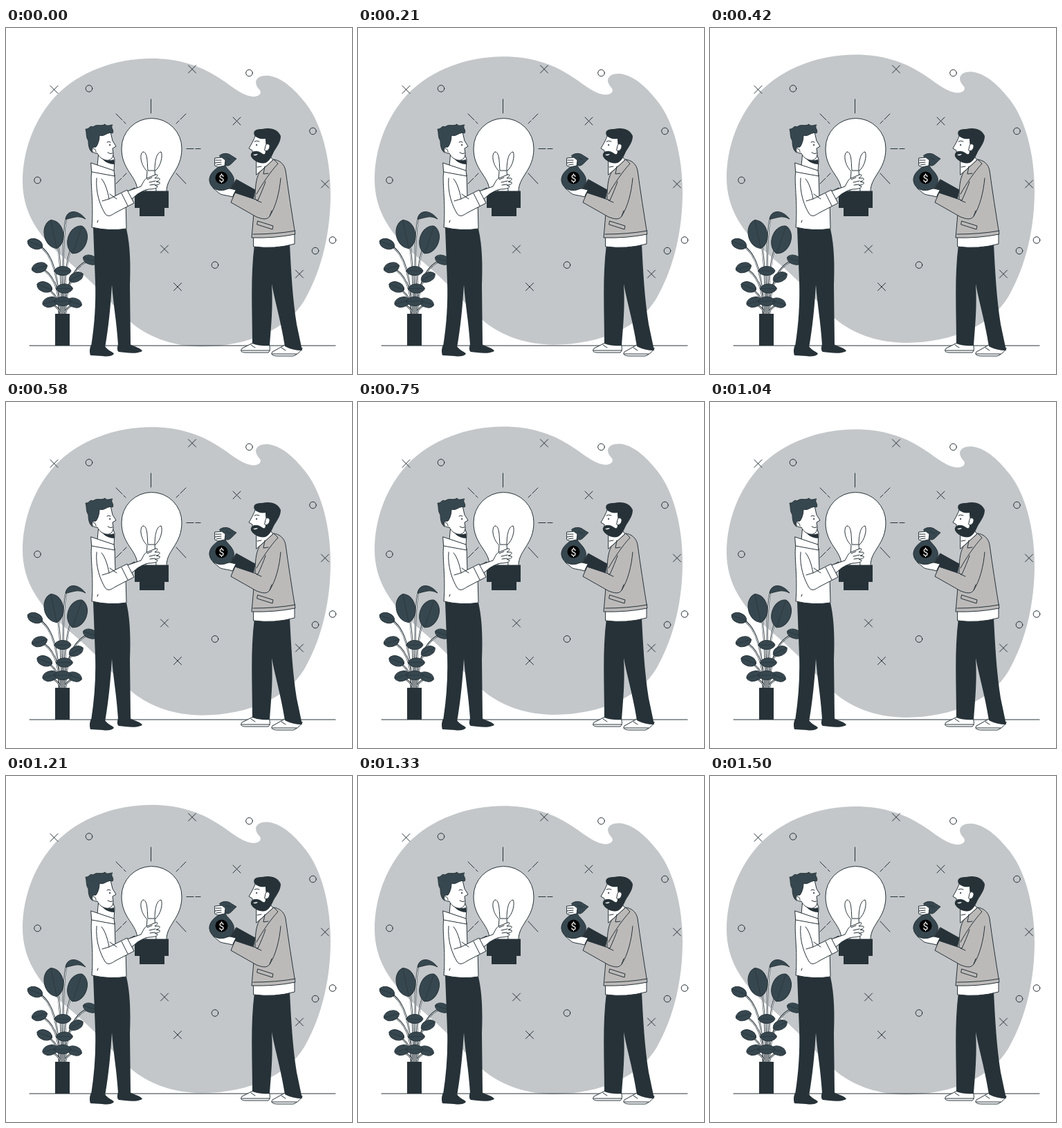
Write an HTML page that moves like this. It is 500 px wide and 500 px high and loops after 1.54 s.

```html
<!DOCTYPE html>
<html lang="en">
<head>
<meta charset="utf-8">
<title>Idea for funding</title>
<style>
html, body { margin: 0; width: 100%; height: 100%; overflow: hidden; background: #fff }
svg { display: block; width: 100vw; height: 100vh }
.ink { fill: none }
.dark { fill: #263238 }
.slate { fill: #37474f }
.skin { fill: #fff }
.coat { fill: #bcbab9 }
.flat { stroke: none }
.crosses { fill: none; stroke: none; marker: url(#cross) }
.rings { fill: none; stroke: none; marker: url(#ring) }
</style>
</head>
<body>
<svg viewBox="0 0 500 500" stroke="#263238" stroke-linecap="round" stroke-linejoin="round">
  <defs>
    <marker id="cross" viewBox="-7 -7 14 14" markerWidth="14" markerHeight="14" markerUnits="userSpaceOnUse">
      <path d="M-5.500 -5.500L5.500 5.500M5.500 -5.500L-5.500 5.500"/>
    </marker>
    <marker id="ring" viewBox="-7 -7 14 14" markerWidth="14" markerHeight="14" markerUnits="userSpaceOnUse">
      <circle r="4.800" class="ink"/>
    </marker>
  </defs>

  <path id="blob" class="flat" fill="#c3c7ca" d="M24 222C24 176 42 130 72 98C106 63 158 44 210 44C248 44 280 54 306 71C324 82 338 96 355 99C365 100 370 95 367 90C363 86 361 82 361 78C362 71 370 68 380 69C401 72 420 92 434 110C456 139 469 188 469 240C469 292 458 347 431 394C407 434 352 460 283 460.500C244 460 211 449 185 429C164 412 148 391 128 372C111 355 94 341 77 326C47 300 24 266 24 222Z"/>
  <path class="ink" d="M34 459H476"/>
  <path class="crosses" d="M69.500 89L269 59.500L333.500 134.500L461 225.500L229 319.500L248 374L424 355.500"/>
  <path class="rings" d="M120 87.500L351.500 65L443.500 149L45.500 220L302 342.500L447 322L472 306.500"/>

  <g id="plant"></g>
  <path class="slate" d="M86 276C88 263 103 261 115 276C104 270 98 274 88 276Z"/>
  <path class="dark flat" d="M71 413H92V459H71Z"/>

  <g id="bulb">
    <path class="skin" d="M190 236C190 214 167 206 167 174A43.500 43.500 0 0 1 254 174C254 206 232 214 232 236Z"/>
    <path class="ink" d="M202 236L204 207C195 199 192 182 198 179C205 179 204 197 205 206H215C215 194 217 180 224 179C227 184 224 200 215 207L217 236"/>
    <path class="dark flat" d="M186 235.500H235V260H229V272H193V260H186Z"/>
    <path class="ink" d="M209.500 103V123M159 124L168 133M170 135L173 138M260 124L252 132M250 134L246 138M261 174.500H271M274 174.500H281M246 210L260 225M174 210L169 215M167 217L159 225"/>
  </g>

  <g id="inventor">
    <path class="dark" d="M162 243L186 231L188 238L169 249Z"/>
    <path class="dark flat" d="M123 458C120 464 121 470 122 473L139 474C146 475 152 475 156 471C155 468 148 467 143 460ZM162 457C160 463 161 467 163 468C173 469 187 472 197 467C195 462 186 461 179 457Z"/>
    <path class="dark flat" d="M126 288L174 290C180 316 180 345 179 372L180 458L162 458C160 425 155 399 153 371C151 404 148 434 143 462L123 460C128 428 130 398 129 367Z"/>
    <path class="skin" d="M134 178L132 199L156 207L157 190L151 174Z"/>
    <path class="skin" d="M128 157L151 150L154 163L159 171L154 174L155 181C155 189 150 192 144 191C137 189 134 185 132 181C123 182 122 171 129 172Z"/>
    <path class="dark flat" d="M139 189Q147 193 156 190L157 197Q146 197 139 189Z"/>
    <path class="slate" d="M125 180C120 177 119 169 119 163C115 157 117 152 115 146C120 147 121 140 126 143C131 138 138 143 143 139C146 143 150 140 154 140C150 144 157 147 154 152C147 149 142 158 135 155C135 162 133 168 130 172C124 170 122 176 125 180Z"/>
    <path class="ink" d="M126 174Q130 175 130 179M146 165Q149 163 151 165M147 180Q151 183 154 181"/>
    <circle class="dark" cx="150" cy="169" r=".6"/>
    <path class="skin" d="M124 207C121 219 127 252 124 288Q150 294 174 290L173 250L167 240L158 244L157 212Z"/>
    <path class="skin" d="M123 195L156 206L157 214L124 208Z"/>
    <path class="skin" d="M172 237L195 229C198 224 200 218 204 217L216 212C220 211 220 214 215 217L221 217C224 218 221 221 217 222L222 223C223 226 219 227 215 227L219 229C219 232 211 233 206 233C200 234 195 237 190 240L176 252Z"/>
    <path class="skin" d="M131 217C129 239 137 258 143 268C147 274 152 271 158 267L185 253L175 234L149 247C147 236 143 223 138 218"/>
    <path class="ink" d="M167 239L176 257M149 247L139 250M150 240L160 247M204 219L211 216M207 223L216 221M208 227L215 226M133 278L132 281"/>
  </g>

  <g id="investor">
    <path class="skin" d="M357 455L341 463C338 467 340 469 347 469L379 469C383 466 381 460 380 456ZM403 458L385 468C382 472 386 474 393 474L415 474C421 472 426 467 428 463Z"/>
    <path class="ink" d="M340 466H381M384 471L420 471M354 458L360 462M398 462L404 466"/>
    <path class="dark flat" d="M359 313L410 312C412 351 414 390 420 428L428 466Q414 466 403 460C397 422 389 397 384 370C386 404 383 431 381 459Q367 460 356 456C356 408 353 360 359 313Z"/>
    <path class="skin" d="M358 299L417 297V312Q388 320 358 316Z"/>
    <path class="dark" d="M333 219L360 234L357 249L326 241L323 233Z"/>
    <path class="skin" d="M362 184L378 180L386 191L362 212Z"/>
    <path class="skin" d="M361 154L384 152L385 172L378 188L357 189L356 177L351 174C354 169 358 162 361 154Z"/>
    <path class="dark flat" d="M359 155C356 147 364 146 370 146C382 143 393 146 397 156C397 165 391 172 387 179C384 186 381 192 375 195C367 197 358 192 355 187C352 183 355 177 361 178C368 177 371 184 374 182C377 176 375 166 375 160C368 161 362 159 359 155Z"/>
    <path class="skin" d="M375 170C376 166 382 167 381 172C380 176 377 179 374 177Z"/>
    <path class="skin flat" d="M357 183Q361 186 364 182Z"/>
    <path class="ink" d="M359 164Q363 162 366 164M363 201L369 200"/>
    <circle class="dark" cx="362" cy="169" r=".6"/>
    <path class="coat" d="M387 190C395 191 402 196 404 206C408 235 413 268 418 298Q388 304 355 303L360 246C360 232 361 218 366 209Z"/>
    <path class="coat" d="M397 217C395 238 390 258 381 272C377 278 370 276 362 273L325 252L331 238L364 249C368 240 372 231 375 222"/>
    <path class="ink" d="M387 190L393 196C382 208 371 224 362 240M374 200L372 211L379 210M357 298Q390 298 418 293M364 279L386 286L385 291L363 284ZM362 249L369 252M381 272L384 264"/>
    <path class="skin" d="M332 234L324 232L313 233C308 230 302 227 299 229C298 232 303 234 306 237C310 242 317 241 327 244Z"/>
  </g>

  <g id="money">
    <path class="slate" d="M309 200C301 204 293 212 294 221C296 233 307 236 316 234C327 231 332 222 328 214C325 207 319 204 317 199Z"/>
    <path class="slate" d="M309 184C315 180 321 181 325 184L333 189C328 193 325 198 321 199L314 198Z"/>
    <path class="skin" d="M302 188L312 187L317 191L316 199L306 201L302 199Z"/>
    <path class="ink" d="M303 191L311 191M302 195L311 194M304 198L311 197M318 187L324 190"/>
    <circle class="flat" cx="311.500" cy="216.500" r="9"/>
    <text class="skin flat" x="311.500" y="221.500" text-anchor="middle" font-family="Roboto, sans-serif" font-size="14">$</text>
  </g>
</svg>
<script>
const get = id => document.getElementById(id);

function leaf(x, y, length, width, angle) {
  return `<g transform="translate(${x} ${y}) rotate(${angle})">
    <path class="slate" d="M${-length} 0C${-length * .8} ${-width * 1.3} ${length * .7} ${-width * 1.4} ${length} 0C${length * .7} ${width * 1.4} ${-length * .8} ${width * 1.3} ${-length} 0Z"/>
    <path d="M${-length * .9} 0H${length * .9}" stroke-width=".6"/>
  </g>`;
}

// A stem leaves the pot upright and bends towards its leaf.
function stem(x, y) {
  const root = 81.5 + (x - 82) * .12;
  const path = `M${root} 413Q${root} ${y + 12} ${x} ${y}`;
  return `<path class="ink" stroke-width="2.4" d="${path}"/><path class="ink" stroke="#fff" d="${path}"/>`;
}

// Even samples of a quadratic curve: the leaf positions of one row.
function row(count, [ax, ay], [bx, by], [cx, cy]) {
  const mix = (a, b, c, t) => (1 - t) ** 2 * a + 2 * t * (1 - t) * b + t * t * c;
  return Array.from({ length: count }, (_, i) => {
    const t = i / (count - 1);
    return [mix(ax, bx, cx, t), mix(ay, by, cy, t)];
  });
}

const left = row(4, [42, 312], [51, 368], [64, 396]);
const right = row(3, [122, 335], [92, 354], [99, 397]);
const middle = row(3, [82, 351], [87, 380], [82, 395]);
const tall = [[69, 298], [103, 306]];
get('plant').innerHTML =
  [...left, ...right, ...tall, [87, 277]].map(p => stem(...p)).join('') +
  tall.map(([x, y]) => leaf(x, y, 21, 13.5, 90 + (x - 82) * .9)).join('') +
  left.map(([x, y], i) => leaf(x, y, 11.5, 7, i % 2 ? -15 : 20)).join('') +
  right.map(([x, y], i) => leaf(x, y, 11, 6.5, i % 2 ? -25 : 18)).join('') +
  middle.map(([x, y]) => leaf(x, y, 12, 6.5, 0)).join('');

// The blob floats 10px up and down at constant speed.
const LOOP = 1540, FLOAT = 1500, LEAD = 58;
function draw(now) {
  const t = Math.min(now % LOOP, FLOAT);
  const phase = (t + LEAD) % FLOAT / FLOAT;
  const lift = 10 * (1 - Math.abs(1 - 2 * phase));
  get('blob').setAttribute('transform', `translate(0 ${0.8 - lift})`);
}
const start = performance.now();
function tick() {
  draw(performance.now() - start);
  requestAnimationFrame(tick);
}
tick();
</script>
</body>
</html>
```
